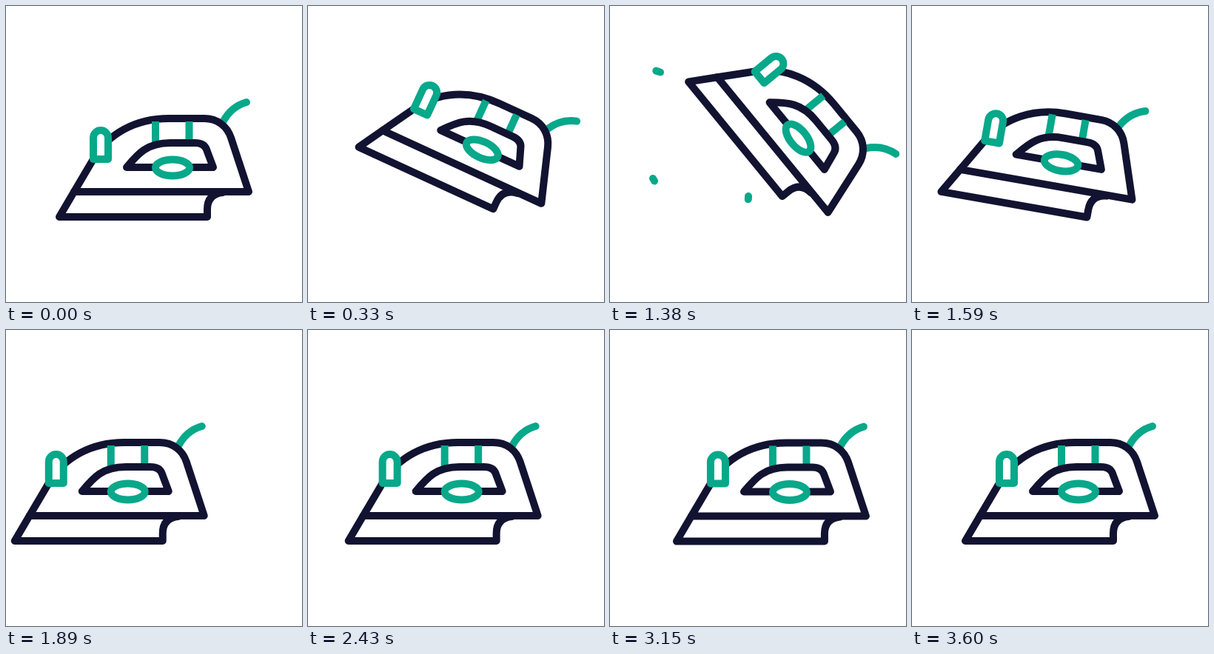
Recreate the animation shown at these times as an HTML page. Size 400 by 400 pixels, loop 5630 ms.

```html
<!DOCTYPE html>
<html lang="en">
<head>
<meta charset="utf-8">
<title>Steam iron</title>
<style>
  html, body { margin: 0; width: 100%; height: 100%; overflow: hidden; background: #fff; }
  svg { display: block; width: 100%; height: 100%; }
  path, ellipse { stroke-width: 10; stroke-linecap: round; stroke-linejoin: round; }
  .navy { stroke: #121331; fill: #fff; }
  .green { stroke: #08a88a; fill: #fff; }
  .line { fill: none; }
  .bar { stroke-linecap: butt; }
</style>
</head>
<body>
<svg viewBox="0 0 400 400">
  <g id="steam">
    <path class="green line" pathLength="100" d="M170 146 L144 157 C84 181 25 160 25 122 C25 95 45 80 68 89.5"/>
    <path class="green line" pathLength="100" d="M181 171 L161 179 C125 194 118 228 95 244 C80 254 66 248 58 233"/>
    <path class="green line" pathLength="100" d="M195 192 L182 199 C150 214 130 250 148 272 C160 286 187 284 187 257"/>
  </g>
  <g id="iron">
    <path class="green line" d="M293 157 Q304 136 325 130"/>
    <path class="navy" d="M92 251 L72 285 H272 V275 Q272 254 293 252"/>
    <path class="navy" d="M92 251 L118 207 C138 172 176 152 220 152 H268 C286 152 299 163 304 178 L328 251 Z"/>
    <path class="green line bar" d="M202 156 V184 M247.5 156 V184"/>
    <path class="navy" d="M163 218 C178 200 190 185 222 185 H255 Q268 185 271 194 L280 218 Z"/>
    <ellipse class="green" cx="225" cy="218.5" rx="23" ry="11"/>
    <path class="green" d="M118 207 V178 A10 10 0 0 1 138 178 V207 Z"/>
  </g>
</svg>
<script>
const LOOP = 5630, STEP = 30, TILT = 60.2;
const iron = document.getElementById('iron');
const puffs = [...document.getElementById('steam').children];

// Cubic ease with handles (0.333, 0) and (0.48, 1)
function ease(u) {
  if (u <= 0) return 0;
  if (u >= 1) return 1;
  let lo = 0, hi = 1, s = 0.5;
  for (let i = 0; i < 24; i++) {
    s = (lo + hi) / 2;
    const r = 1 - s;
    const x = r * r * s + 1.44 * r * s * s + s * s * s;
    if (x < u) lo = s; else hi = s;
  }
  return s * s * (3 - 2 * s);
}

const span = (t, a, b) => Math.min(1, Math.max(0, (t - a) / (b - a)));
const move = (t, a, b) => ease(span(t, a, b));
const dip = (t, a, b) => Math.sin(Math.PI * span(t, a, b));

function draw(t) {
  const angle = TILT * (move(t, 0, 870) - move(t, 1272, 1752));
  const x = -64 * move(t, 1315, 2040) + 99 * move(t, 2155, 2820) - 35 * move(t, 2820, 3600);
  const y = 4.2 * dip(t, 1272, 1752) + 0.6 * dip(t, 2820, 3600);
  iron.setAttribute('transform', `translate(${x} ${y}) rotate(${angle} 285.5 230)`);

  puffs.forEach((puff, i) => {
    const head = 100 * move(t, i === 2 ? 625 : 610, 1020);
    const tail = 100 * move(t, 720, 1485);
    const length = head - tail;
    puff.style.display = length > 0.4 ? '' : 'none';
    puff.setAttribute('stroke-dasharray', `${Math.max(length, 0)} 300`);
    puff.setAttribute('stroke-dashoffset', -tail);
  });
}

const start = performance.now();
function tick() {
  const t = (performance.now() - start) % LOOP;
  draw(Math.floor(t / STEP) * STEP);
  requestAnimationFrame(tick);
}
draw(0);
requestAnimationFrame(tick);
</script>
</body>
</html>
```
